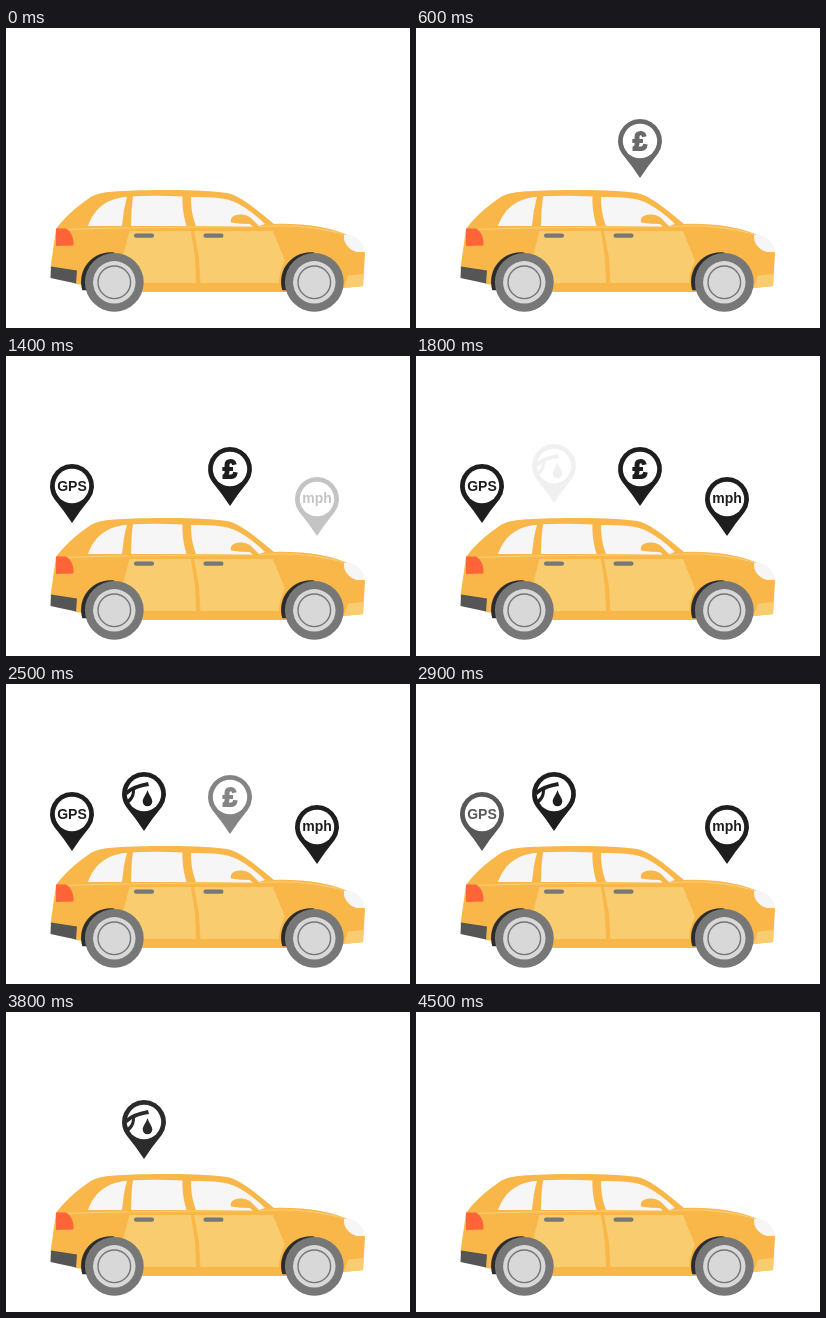
An HTML page that plays this animation: 404 px wide and 300 px high, repeating every 4600 ms.

```html
<!DOCTYPE html>
<html lang="en">
<head>
<meta charset="utf-8">
<title>Car cost pins</title>
<style>
  html, body { margin: 0; width: 100%; height: 100%; overflow: hidden; background: #fff; }
  svg { display: block; width: 404px; height: 300px; }
  text { font: bold 14px "Liberation Sans", Arial, sans-serif; text-anchor: middle; }
  .body { fill: #f8b748; }
  .panel { fill: #f9cc6f; }
  .glass { fill: #f6f6f6; }
  .grey { fill: #777; }
  .pin { fill: #1e1e1e; opacity: 0; }
</style>
</head>
<body>
<svg viewBox="0 0 404 300">
  <defs>
    <g id="wheel">
      <path d="M-32 8A29.500 29.500 0 0 1 0-29.800V8Z" fill="#2c2c2c"/>
      <circle r="29.400" class="grey"/>
      <circle r="21.200" fill="#d8d8d8"/>
      <circle r="16.300" fill="none" stroke="#777" stroke-width="1.400"/>
    </g>
    <g id="marker">
      <path d="M0-22A22 22 0 0 1 17.700 13Q7.800 25 0 37Q-7.800 25-17.700 13A22 22 0 0 1 0-22Z"/>
      <circle r="17.200" fill="#fff"/>
    </g>
  </defs>

  <!-- Car -->
  <path class="body" d="M44.500 240L50 201C57 191 70 179 82 171C93 163 106 163 150 162C180 162 205 162.500 221 165C235 168 250 181 268 196C296 195 323 199 339 206C350 209 358 218 359 226L357 258L338 260L300 264H120L70 256Z"/>
  <path class="panel" d="M123.500 203H185L189 230L190 255H137C136 243 129 234 117 228Z"/>
  <path class="panel" d="M188 203H267L279 233C275 240 273 248 273 255H194.500L193 230Z"/>
  <path d="M58 202C110 198 220 200 268 198C297 197 320 201 339 206.500" fill="none" stroke="#f9cc6f" stroke-width="1.200"/>
  <path class="panel" d="M342 247.500L357.700 246L357 258L338 260Z"/>
  <path class="glass" d="M82 198C88 182 98 171 121 168.700Q117 183 116 198Z"/>
  <path class="glass" d="M127 168.300Q150 167 176.500 168.500C176 180 178 189 180.500 198H125Q125 182 127 168.300Z"/>
  <path class="glass" d="M185 169C207 169 220 169.500 231 175Q246 183 259 196L252 198.500L190 198C186 188 185 179 185 169Z"/>
  <path class="body" d="M225 194.500C223.500 188 230 186.500 236 186.500Q242 187 245 190L254 199H247L244 196Q235 196 225 194.500Z"/>
  <rect class="grey" x="128" y="205.500" width="20" height="4.300" rx="2"/>
  <rect class="grey" x="197.500" y="205.500" width="20" height="4.300" rx="2"/>
  <path d="M50 200.500H60C65 203 68 210 67.500 217.500L50 218Z" fill="#ff6338"/>
  <path class="glass" d="M338 207C348 205.500 358 213 358.700 224H351C343 222 337 215 338 207Z"/>
  <path d="M45 238.500L71 242.500L70 255.500L44.500 250Z" fill="#555"/>
  <use href="#wheel" x="108.300" y="254.300"/>
  <use href="#wheel" x="308.300" y="254.300"/>

  <!-- Pins, in order of appearance -->
  <g class="pin" transform="translate(224 113)">
    <use href="#marker"/>
    <text y="8.800" stroke="#1e1e1e" stroke-width="1.800" style="font-size:25px">£</text>
  </g>
  <g class="pin" transform="translate(66 130)">
    <use href="#marker"/>
    <text y="4.500">GPS</text>
  </g>
  <g class="pin" transform="translate(311 143)">
    <use href="#marker"/>
    <text y="3.500">mph</text>
  </g>
  <g class="pin" transform="translate(138 110)">
    <use href="#marker"/>
    <path d="M-18-3Q-12-9 4-12L5-8Q-5-6.500-9-4C-9 3-12 7-16 10L-18 7C-14 4-12 1-12-3L-17 1Z"/>
    <path d="M3.500-4C5 1 8.300 4 8.300 7.500A4.800 4.800 0 0 1-1.300 7.500C-1.300 4 2 1 3.500-4Z"/>
  </g>
</svg>
<script>
  const LOOP = 4600, STEP = 100, FADE = 500, START = 270, HOLD = 2000;
  const pins = document.querySelectorAll('.pin');
  const ramp = t => Math.min(1, Math.max(0, t / FADE));

  function draw() {
    const t = Math.floor(performance.now() % LOOP / STEP) * STEP;
    pins.forEach((pin, i) => {
      const age = t - START - i * FADE;
      pin.style.opacity = ramp(age) - ramp(age - HOLD);
    });
    requestAnimationFrame(draw);
  }
  draw();
</script>
</body>
</html>
```
